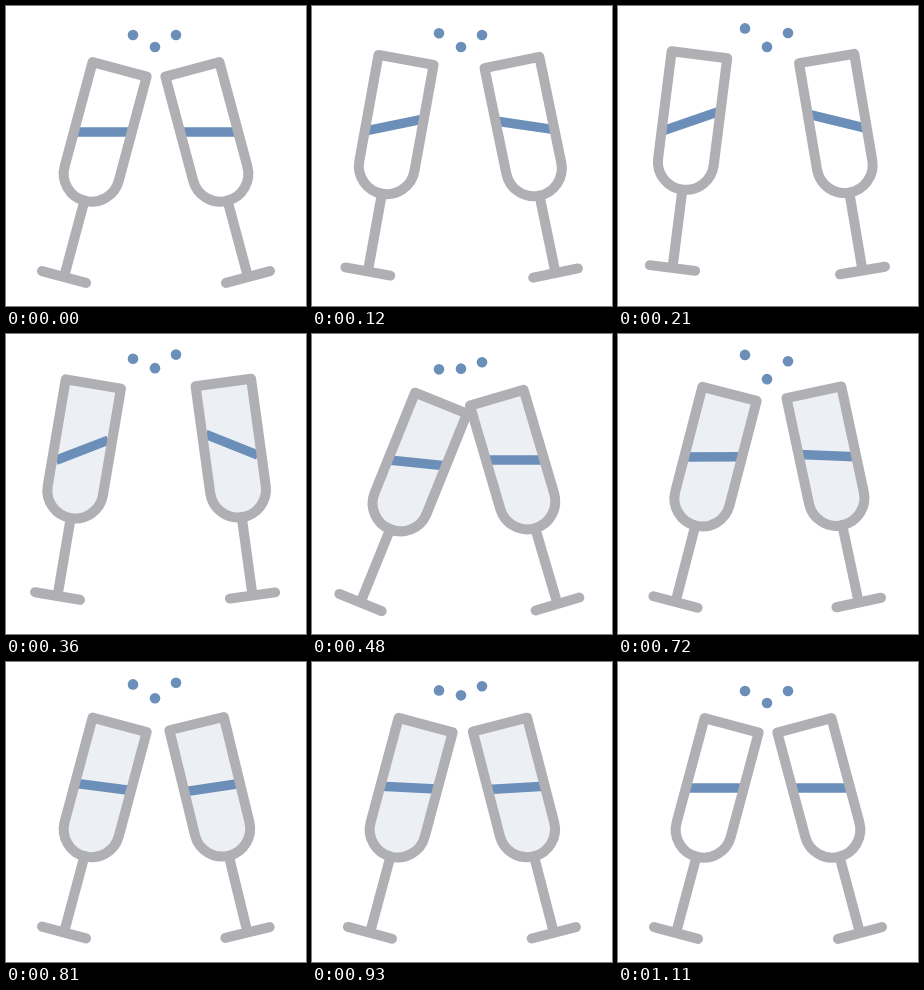
Animation of 300x300 px, one loop 1530 ms. Source, as an HTML page:

```html
<!DOCTYPE html>
<html lang="en">
<head>
<meta charset="utf-8">
<title>Cheers</title>
<style>
  html, body { margin: 0; width: 100%; height: 100%; overflow: hidden; background: #fff; }
  svg { display: block; width: 100%; height: 100%; }
  .frame { fill: none; stroke: #b0b0b4; stroke-width: 10; stroke-linecap: round; stroke-linejoin: round; }
  .wine { stroke: #6b8fb9; stroke-width: 9.5; }
  .dot { fill: #6b8fb9; }
  .tint { fill: #ecf0f5; }
</style>
</head>
<body>
<svg viewBox="0 0 300 300">
  <defs>
    <path id="bowl" d="M-28 -215H28V-107A28 28 0 0 1 -28 -107Z"/>
    <path id="foot" d="M0 -79V0M-22.8 0H22.8"/>
  </defs>
  <g id="stage"></g>
</svg>
<script>
const LOOP = 1530, STEP = 30;
const TINT_ON = 270, TINT_OFF = 960;

// rest, lean back, hold, clink, rebound, settle, rest
const BEATS = [0, 210, 360, 480, 630, 810, 1020];

// Each pose: foot x, foot y, glass angle, wine angle on screen
const LEFT = [
  [58, 271, 15, 0],
  [54.5, 262, 7.2, -19],
  [51.5, 262, 9.6, -21],
  [48.5, 268.5, 22, 6],
  [57, 265.5, 14.1, -7.7],
  [58, 270.5, 15, 7.4]
];
const RIGHT = [
  [242, 271, -15, 0],
  [244.5, 264.5, -9.6, 13.5],
  [246.5, 261.5, -7.8, 21.8],
  [245.5, 270, -16.4, 0],
  [240, 266.5, -10.4, 13.2],
  [241.5, 270.5, -13.7, -8.5]
];

// All dots share one bob and start it one after another
const BOB = [0, -8.4, 7, -8.4, 0], BOB_BEAT = 230;
const DOTS = [
  { x: 127, y: 29, delay: 50 },
  { x: 149, y: 41, delay: 195 },
  { x: 170, y: 29, delay: 135 }
];

const ease = u => (1 - Math.cos(Math.PI * u)) / 2;
const mix = (a, b, u) => a + (b - a) * u;

function bob(t) {
  const beat = Math.min(Math.max(t / BOB_BEAT, 0), BOB.length - 1);
  const i = Math.min(Math.floor(beat), BOB.length - 2);
  return mix(BOB[i], BOB[i + 1], ease(beat - i));
}

function poseAt(poses, t) {
  const i = BEATS.findLastIndex(beat => t >= beat);
  if (i === poses.length) return poses[0];
  const next = poses[(i + 1) % poses.length];
  const u = ease((t - BEATS[i]) / (BEATS[i + 1] - BEATS[i]));
  return poses[i].map((value, k) => mix(value, next[k], u));
}

function add(parent, tag, attrs) {
  const el = document.createElementNS("http://www.w3.org/2000/svg", tag);
  for (const name in attrs) el.setAttribute(name, attrs[name]);
  return parent.appendChild(el);
}

const stage = document.getElementById("stage");

const glasses = [LEFT, RIGHT].map(poses => {
  const group = add(stage, "g", {});
  const tint = add(group, "use", { href: "#bowl", class: "tint" });
  const wine = add(group, "path", { d: "M-28 0H28", class: "wine" });
  add(group, "use", { href: "#foot", class: "frame" });
  add(group, "use", { href: "#bowl", class: "frame" });
  return { poses, group, tint, wine };
});

const dots = DOTS.map(d => ({ ...d, el: add(stage, "circle", { cx: d.x, r: 5.3, class: "dot" }) }));

function draw(t) {
  const tinted = t >= TINT_ON && t < TINT_OFF;
  for (const { poses, group, tint, wine } of glasses) {
    const [x, y, angle, tilt] = poseAt(poses, t);
    const level = 150 + tilt * 0.1;
    group.setAttribute("transform", `translate(${x} ${y}) rotate(${angle})`);
    wine.setAttribute("transform", `translate(0 ${-level}) rotate(${tilt - angle})`);
    tint.setAttribute("visibility", tinted ? "visible" : "hidden");
  }
  for (const { y, delay, el } of dots) el.setAttribute("cy", y + bob(t - delay));
}

const start = performance.now();
function tick() {
  const t = (performance.now() - start) % LOOP;
  draw(Math.floor(t / STEP) * STEP);
  requestAnimationFrame(tick);
}
tick();
</script>
</body>
</html>
```
